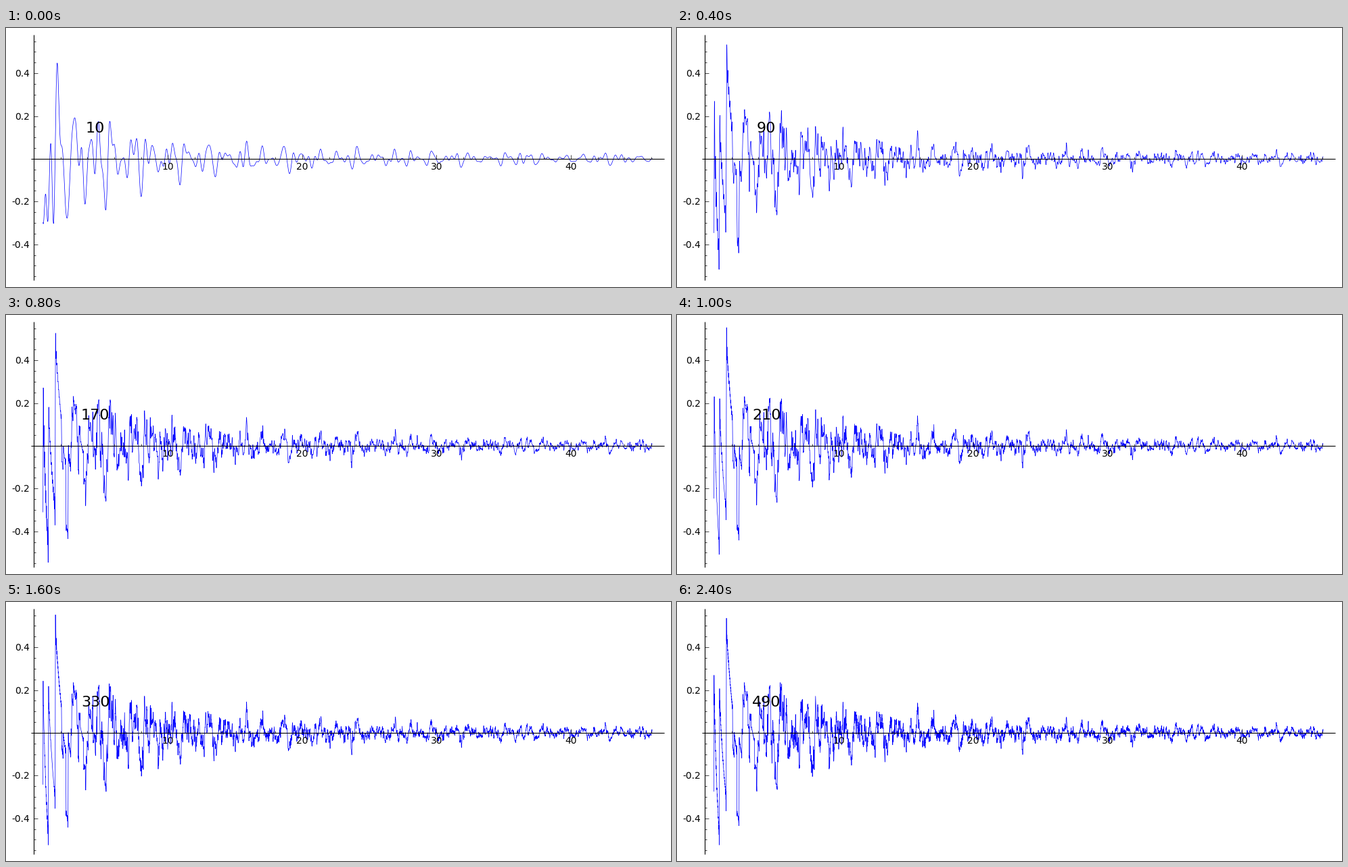
Recreate the animation shown at these times as a matplotlib script. Size 983 by 384 pixels, loop 2.6 s.

```python
import numpy as np
import matplotlib.pyplot as plt
from matplotlib.animation import FuncAnimation

WIDTH, HEIGHT, DPI = 983, 384, 100
COUNTS = range(10, 491, 40)
CONDUCTOR = 43
plt.rcParams["font.family"] = "DejaVu Sans"


def curve_coefficients(size):
    """Dirichlet coefficients of the L-series of y^2 + y = x^3 + x^2."""
    coef = np.ones(size + 1)
    coef[0] = 0
    for p in range(2, size + 1):
        if any(p % d == 0 for d in range(2, int(p ** 0.5) + 1)):
            continue
        r = np.arange(p)
        left = np.bincount((r * r + r) % p, minlength=p)
        right = np.bincount((r ** 3 + r * r) % p, minlength=p)
        trace = p - int(left @ right)
        norm = 0 if p == CONDUCTOR else p
        previous, current, power = 1, trace, p
        while power <= size:
            multiples = np.arange(power, size + 1, power)
            coef[multiples[(multiples // power) % p != 0]] *= current
            previous, current = current, trace * current - norm * previous
            power *= p
    return coef


def critical_zeros(number, tilt=0.06, step=0.005, length=2 ** 18):
    """Positive zero ordinates, from a Mellin transform along a tilted ray."""
    coef = curve_coefficients(800)
    v = np.arange(0, 6.6, step)
    ray = np.exp(v + 1j * (np.pi / 2 - tilt))
    n = np.arange(1, len(coef))
    decay = np.exp(-2 * np.pi / np.sqrt(CONDUCTOR) * np.outer(ray, n))
    samples = ray * (decay @ coef[1:])
    samples[0] /= 2
    t = 2 * np.pi * np.arange(length) / (length * step)
    values = (length * np.fft.ifft(samples, length)).imag * np.exp(tilt * np.minimum(t, 340))
    t, values = t[1:], values[1:]
    k = np.nonzero(values[:-1] * values[1:] < 0)[0][:number]
    return t[k] + (t[k + 1] - t[k]) * values[k] / (values[k] - values[k + 1])


def px(x):
    return 40.9 + 19.85 * x


def py(y):
    return 193.9 - 317 * y


# The list of zeros starts with the central one, which adds no oscillation.
zeros = critical_zeros(COUNTS[-1] - 1)
xs = np.linspace(np.log(2), 20 * np.log(10), 6400)
waves = np.sin(np.outer(xs, zeros)) / zeros
curves = [2 / xs * waves[:, :count - 1].sum(axis=1) for count in COUNTS]

fig = plt.figure(figsize=(WIDTH / DPI, HEIGHT / DPI), dpi=DPI, facecolor="white")
ax = fig.add_axes([0, 0, 1, 1])
ax.set(xlim=(0, WIDTH), ylim=(HEIGHT, 0))
ax.axis("off")


def segment(x0, y0, x1, y1, width):
    ax.plot([x0, x1], [y0, y1], color="black", lw=width, zorder=2.5,
            solid_capstyle="butt")


segment(36.7, py(0), 973, py(0), 0.8)
segment(px(0), 10, px(0), 374, 0.8)

for x in range(2, 47, 2):
    major = x % 10 == 0
    segment(px(x), py(0), px(x), py(0) - (5.6 if major else 2.8), 0.5)
    if major:
        ax.text(px(x), 209.6, str(x), size=10, ha="center", va="baseline", zorder=2.6)

for k in range(-11, 12):
    y = k / 20
    major = k % 4 == 0
    segment(px(0), py(y), px(0) + (5.6 if major else 2.8), py(y), 0.5)
    if major and k:
        ax.text(px(0) - 5.6, py(y) + 5, f"{y:.1f}", size=10, ha="right",
                va="baseline", zorder=2.6)

line, = ax.plot([], [], color="blue", lw=0.5, zorder=2)
label = ax.text(px(4.6), 155, "", size=16, ha="center", va="baseline", zorder=3)


def draw(frame):
    line.set_data(px(xs), py(curves[frame]))
    label.set_text(str(COUNTS[frame]))
    return line, label


animation = FuncAnimation(fig, draw, frames=len(COUNTS), interval=200,
                          repeat=True, repeat_delay=0)
plt.show()
```
